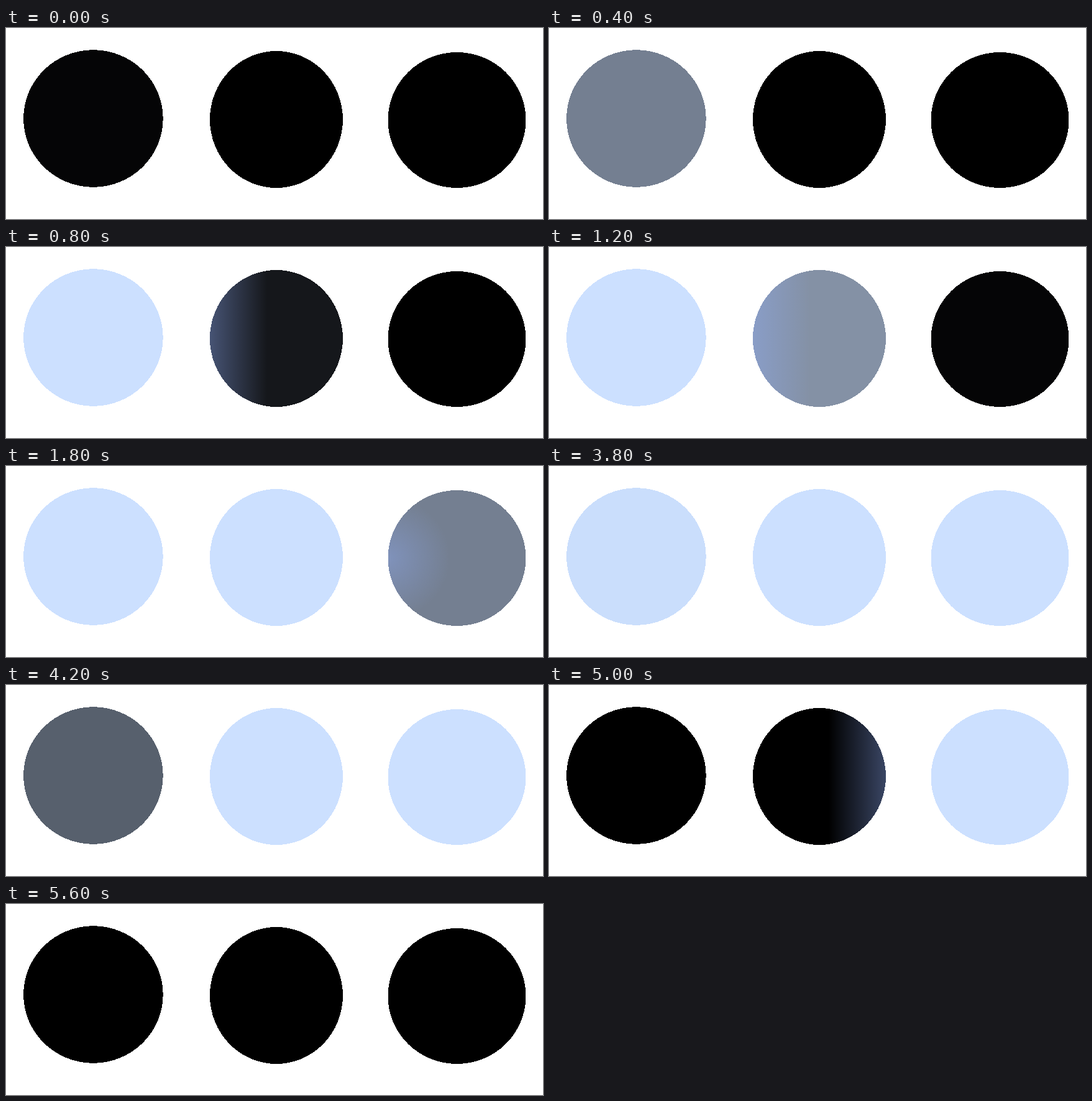
An HTML page for the animation above (6.2 s loop, 864 px wide and 307 px high).

```html
<!DOCTYPE html>
<html lang="en">
<head>
<meta charset="utf-8">
<title>Three lamps</title>
<style>
  html, body { margin: 0; width: 100%; height: 100%; overflow: hidden; background: #fff; }
  svg { display: block; width: 100%; height: 100%; shape-rendering: crispEdges; }
</style>
</head>
<body>
<svg viewBox="0 0 864 307">
  <defs>
    <linearGradient id="band-left" x1="0" x2=".43" y1="0" y2="0">
      <stop stop-color="#91affa" stop-opacity=".4"/>
      <stop offset="1" stop-color="#91affa" stop-opacity="0"/>
    </linearGradient>
    <linearGradient id="band-right" href="#band-left" gradientTransform="matrix(-1 0 0 1 1 0)"/>
    <radialGradient id="spot-left" cx="0" cy=".5" r=".45">
      <stop stop-color="#91affa" stop-opacity=".4"/>
      <stop offset="1" stop-color="#91affa" stop-opacity="0"/>
    </radialGradient>
    <radialGradient id="spot-right" href="#spot-left" gradientTransform="matrix(-1 0 0 1 1 0)"/>
  </defs>
</svg>
<script>
const LOOP = 6200, STEP = 200, LIGHT = [204, 224, 255];
const svg = document.querySelector('svg');

// on/off: brightness ramps; glowIn/glowOut: when light shows at the left/right edge (ms)
const lamps = [
  { shape: [140.4, 145.5, 112.3, 110.3], on: [-80, 800], off: [3750, 4570] },
  { shape: [435, 147, 107, 110], on: [600, 1600], off: [4200, 5000],
    glow: 'band', glowIn: [600, 1500], glowOut: [4500, 5350] },
  { shape: [725.5, 148, 111, 109], on: [1080, 2400], off: [5000, 5600],
    glow: 'spot', glowIn: [1200, 2400], glowOut: [5000, 5600] }
];

const clamp = x => Math.max(0, Math.min(1, x));
const ramp = (t, [start, end]) => {
  const p = clamp((t - start) / (end - start));
  return p * p * (3 - 2 * p);
};
const pulse = (t, [start, end]) => clamp(Math.min(t - start, end - t) / 200);

function addEllipse([cx, cy, rx, ry], fill) {
  const ellipse = document.createElementNS(svg.namespaceURI, 'ellipse');
  for (const [name, value] of Object.entries({ cx, cy, rx, ry, fill })) ellipse.setAttribute(name, value);
  return svg.appendChild(ellipse);
}

for (const lamp of lamps) {
  lamp.base = addEllipse(lamp.shape, '#000');
  if (!lamp.glow) continue;
  lamp.left = addEllipse(lamp.shape, `url(#${lamp.glow}-left)`);
  lamp.right = addEllipse(lamp.shape, `url(#${lamp.glow}-right)`);
}

function draw(now) {
  const t = Math.floor((now % LOOP) / STEP) * STEP;
  for (const lamp of lamps) {
    const level = ramp(t, lamp.on) - ramp(t, lamp.off);
    lamp.base.setAttribute('fill', `rgb(${LIGHT.map(c => Math.round(c * level))})`);
    if (!lamp.glow) continue;
    lamp.left.setAttribute('opacity', pulse(t, lamp.glowIn));
    lamp.right.setAttribute('opacity', pulse(t, lamp.glowOut));
  }
}

const start = performance.now();
function tick() {
  draw(performance.now() - start);
  requestAnimationFrame(tick);
}
tick();
</script>
</body>
</html>
```
